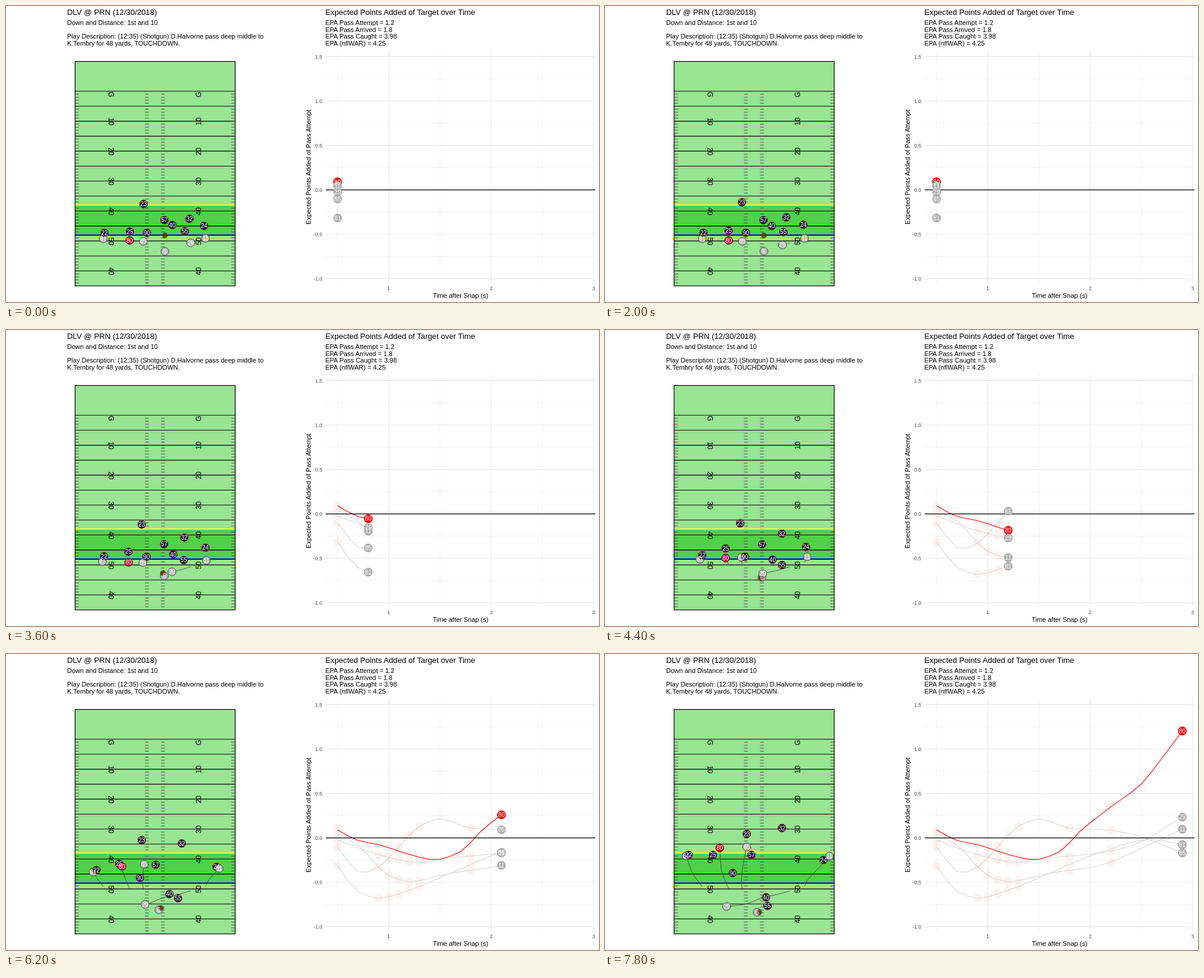
An HTML page that plays this animation: 1000x500 px, repeating every 8 s.

```html
<!DOCTYPE html>
<html lang="en">
<head>
<meta charset="utf-8">
<title>Expected points by target</title>
<style>
html, body { margin: 0; width: 100%; height: 100%; overflow: hidden; background: #fff; }
svg { display: block; width: 1000px; height: 500px; font: 11px "Liberation Sans", Arial, sans-serif; }
</style>
</head>
<body>
<svg id="stage" viewBox="0 0 1000 500" xmlns="http://www.w3.org/2000/svg"></svg>
<script>
const LOOP = 8000, STEP = 200, SNAP = 10;
const stage = document.getElementById('stage');

function set(el, attrs) {
  for (const k in attrs) el.setAttribute(k, attrs[k]);
}
function add(tag, attrs, parent = stage, label) {
  const el = document.createElementNS('http://www.w3.org/2000/svg', tag);
  set(el, attrs);
  if (label !== undefined) el.textContent = label;
  return parent.appendChild(el);
}
const group = (attrs = {}) => add('g', attrs);
const line = (x1, y1, x2, y2, stroke, width) =>
  add('line', { x1, y1, x2, y2, stroke, 'stroke-width': width });
const text = (x, y, label, attrs = {}, parent) => add('text', { x, y, ...attrs }, parent, label);

// Monotone cubic curve through the knots; `first` is the slope at the start
function curve(xs, ys, first) {
  const n = xs.length;
  const slope = i => (ys[i + 1] - ys[i]) / (xs[i + 1] - xs[i]);
  const tan = xs.map((_, i) => {
    if (i === 0) return first ?? slope(0);
    if (i === n - 1) return slope(n - 2);
    const a = slope(i - 1), b = slope(i);
    if (a * b <= 0) return 0;
    const h = xs[i] - xs[i - 1], k = xs[i + 1] - xs[i];
    return 3 * (h + k) / ((2 * k + h) / a + (k + 2 * h) / b);
  });
  return x => {
    if (x <= xs[0]) return ys[0];
    if (x >= xs[n - 1]) return ys[n - 1];
    let i = 0;
    while (x > xs[i + 1]) i++;
    const h = xs[i + 1] - xs[i], u = (x - xs[i]) / h, v = 1 - u;
    return ys[i] * v * v * (1 + 2 * u) + ys[i + 1] * u * u * (3 - 2 * u)
      + h * u * v * (tan[i] * v - tan[i + 1] * u);
  };
}
const column = (pts, i) => pts.map(p => p[i]);

// A path on the field that starts from rest
function route(keys, pts) {
  const x = curve(keys, column(pts, 0), 0), y = curve(keys, column(pts, 1), 0);
  return k => [x(k), y(k)];
}
const pathOf = (count, at) =>
  'M' + Array.from({ length: count }, (_, i) => at(i).map(v => v.toFixed(2)).join(' ')).join('L');

// Headings
text(103, 15, 'DLV @ PRN (12/30/2018)', { 'font-size': 13.2 });
text(103, 32, 'Down and Distance: 1st and 10');
text(103, 55, 'Play Description: (12:35) (Shotgun) D.Halvorne pass deep middle to');
text(103, 67, 'K.Tembry for 48 yards, TOUCHDOWN.');
text(538.5, 15, 'Expected Points Added of Target over Time', { 'font-size': 13.2 });
['EPA Pass Attempt = 1.2', 'EPA Pass Arrived = 1.8', 'EPA Pass Caught = 3.98', 'EPA (nflWAR) = 4.25']
  .forEach((s, i) => text(538.5, 32 + i * 11.7, s));

// Field
const L = 116.5, R = 386.5, TOP = 93.6;
const yardY = n => 144 + n * 5.058;
const field = { x: L, y: TOP, width: R - L, height: yardY(65) - TOP };
add('rect', { ...field, fill: '#98e593' });
add('rect', { x: L, y: 336.3, width: R - L, height: 50.7, fill: '#4fd247' });
for (let n = 0; n < 65; n++) {
  if (n % 5 === 0) line(L, yardY(n), R, yardY(n), '#000', 1.1);
  else for (const x of [L, 234.3, 261.4, 380])
    line(x, yardY(n), x + 6.5, yardY(n), '#333', 0.8);
}
['G', 10, 20, 30, 40, 50, 40].forEach((s, i) => {
  const y = yardY(i * 10) + (i ? 0.5 : 5.5);
  for (const [x, turn] of [[177, 90], [325, -90]])
    text(0, 4.2, s, { 'font-size': 12, 'text-anchor': 'middle', transform: `translate(${x} ${y}) rotate(${turn})` });
});
line(L, 336.3, R, 336.3, '#ffff00', 2);
line(L, 387, R, 387, '#0000cd', 2);
add('rect', { ...field, fill: 'none', stroke: '#000', 'stroke-width': 1.2 });

// Chart
const px = s => 472.8 + s * 172.7, py = v => 310.7 - v * 150.2;
const ghosts = group({ fill: '#d85050', opacity: 0.07 });
for (let i = -4; i <= 6; i++) line(539, py(i / 4), 994, py(i / 4), '#e8e8e8', i % 2 ? 0.6 : 1.1);
for (let i = 1; i <= 6; i++) line(px(i / 2), 74, px(i / 2), 468, '#e8e8e8', i % 2 ? 0.6 : 1.1);
const tick = { 'font-size': 8.8, fill: '#4d4d4d' };
for (let i = -2; i <= 3; i++) text(533.5, py(i / 2) + 3.1, (i / 2).toFixed(1), { ...tick, 'text-anchor': 'end' });
for (let i = 1; i <= 3; i++) text(px(i), 480, i, { ...tick, 'text-anchor': 'middle' });
text(766.5, 493, 'Time after Snap (s)', { 'text-anchor': 'middle' });
text(0, 0, 'Expected Points Added of Pass Attempt', { 'text-anchor': 'middle', transform: 'translate(513.5 272) rotate(-90)' });

// Players: four points run from the snap, a fifth in front adds a shift before it
const KEYS = [0, 14, 22, 31, 39];
const trails = group({ fill: 'none', stroke: '#333', 'stroke-opacity': 0.8 });
const discs = group();
const marks = { 'font-size': 10, fill: '#fff', 'text-anchor': 'middle' };
const numbers = group(marks);
const OFFENSE = { fill: '#b9b9b9', 'fill-opacity': 0.92, stroke: '#4a4a4a' };
const DEFENSE = { fill: '#141c33', stroke: '#8a2a20' };
const TARGET = { fill: '#e3042c', stroke: '#3a1a1a' };
const players = [];
function player(id, look, ...pts) {
  players.push({
    at: route(KEYS.slice(-pts.length), pts),
    disc: add('circle', { r: 6.7, ...look }, discs),
    num: text(0, 0, id, {}, numbers),
    trail: look !== DEFENSE && id !== 6 && add('path', {}, trails)
  });
}
player(6, OFFENSE, [268, 414.5], [264.5, 418], [257.7, 432], [256.5, 436]);
player(81, OFFENSE, [164, 393], [160, 387.5], [147, 368.5], [137, 341]);
player(85, OFFENSE, [231.5, 397.5], [230, 384], [233, 355], [239, 326]);
player(29, OFFENSE, [311.5, 400], [291, 406], [266, 411.5], [234.5, 423], [205, 426.5]);
player(22, DEFENSE, [166, 383], [164, 380.5], [152.5, 365], [141, 339.5]);
player(23, DEFENSE, [232, 334.5], [230, 330], [228, 326.5], [229, 314.5], [239, 304]);
player(24, DEFENSE, [334, 371.5], [335, 368.5], [339, 366.5], [355, 359.5], [368.5, 348]);
player(25, DEFENSE, [209, 381], [208, 378], [203.5, 369], [191, 354.5], [182, 339.5]);
player(32, DEFENSE, [309.5, 359.5], [303.5, 355], [298.5, 344], [296.5, 320], [298.5, 294]);
player(57, DEFENSE, [267.3, 361.7], [265, 362], [252.5, 356], [247, 339.5]);
player(90, DEFENSE, [237.5, 383], [236, 383], [226, 378], [215.5, 370]);
player(40, DEFENSE, [280.5, 370], [281.5, 373], [282.5, 388], [275.5, 405.5], [271.5, 411]);
player(55, DEFENSE, [301.5, 380.5], [300.5, 383], [298.5, 397], [290, 412.5], [274, 425.5]);
player(80, TARGET, [208.5, 396], [203.5, 385.3], [195.5, 359], [193.5, 327.5]);
player(11, OFFENSE, [336.5, 392.5], [341, 383], [359.5, 362.5], [378.5, 341.5]);

const ballAt = route([SNAP, 14, 22, 39], [[268, 387.5], [266.3, 400], [263, 419], [260, 436]]);
const ball = add('circle', { r: 4.7, fill: '#5a2d12', 'fill-opacity': 0.85 }, discs);

// Value curves: knots of tenths of a second after the snap and height
const lines = group({ fill: 'none', 'stroke-width': 1.1 });
line(539, py(0), 994, py(0), '#000', 1.2);
const dots = group(), tags = group(marks);
const series = [];
function serie(id, color, stroke, ...knots) {
  series.push({
    at: curve(column(knots, 0), column(knots, 1)),
    path: add('path', { stroke }, lines),
    dot: add('circle', { r: 7.4, fill: color }, dots),
    tag: text(0, 0, id, {}, tags)
  });
}
const gray = (id, ...knots) => serie(id, '#afafaf', '#d6d6d6', ...knots);
serie(80, '#f8060c', '#ff0000', [5, 297], [7, 315], [9, 322], [12, 338.5], [14.5, 347.5], [17, 334],
  [19, 299.5], [22, 258.5], [25, 219.5], [27, 176], [29, 130]);
gray(11, [5, 304], [7, 323], [10, 374], [12, 384.5], [16, 370.5], [21, 357], [24, 336], [29, 296]);
gray(29, [5, 314], [9, 339], [13, 352.3], [16, 344.5], [21, 336], [24, 324], [29, 275.5]);
gray(85, [5, 326], [7.4, 370], [9, 360], [11, 325], [13, 291], [15, 278.5], [18, 294], [22, 298], [24, 304], [29, 336]);
gray(81, [5, 358], [7, 401], [9, 412.5], [12, 399], [16, 370.5], [21, 335], [26, 313], [29, 322]);
lines.append(series[0].path);

const faded = [];
for (const k of [5, 9, 10, 11, 12, 13, 18, 22])
  for (const s of series)
    faded.push({ k, el: add('circle', { cx: px(k / 10), cy: s.at(k), r: 7.4 }, ghosts) });

function place(disc, label, [x, y]) {
  set(disc, { cx: x, cy: y });
  set(label, { x, y: y + 3.6 });
}

function draw(ms) {
  const f = Math.floor((ms % LOOP) / STEP);
  for (const p of players) {
    place(p.disc, p.num, p.at(f));
    if (p.trail) set(p.trail, { d: pathOf(f + 1, p.at) });
  }
  const [cx, cy] = ballAt(f);
  set(ball, { cx, cy });

  const k = Math.max(5, f - SNAP);
  for (const s of series) {
    const point = j => [px(j / 10), s.at(j)];
    place(s.dot, s.tag, point(k));
    set(s.path, { d: pathOf(k - 4, i => point(i + 5)) });
  }
  for (const g of faded) set(g.el, { visibility: g.k < k ? 'visible' : 'hidden' });
}

const start = performance.now();
function loop(now) {
  draw(Math.max(0, now - start));
  requestAnimationFrame(loop);
}
draw(0);
requestAnimationFrame(loop);
</script>
</body>
</html>
```
